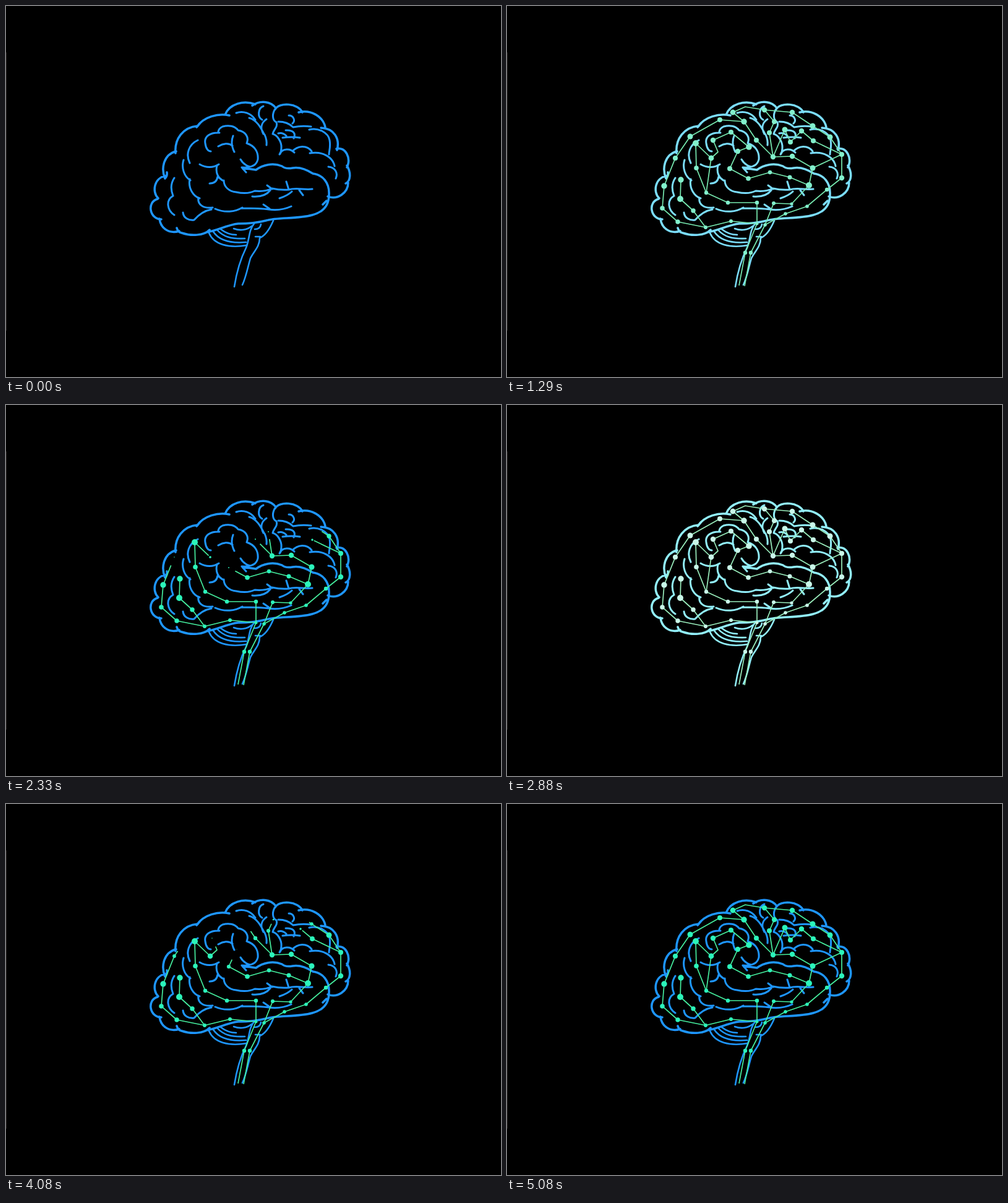
An HTML page for the animation above (5.12 s loop, 800 px wide and 600 px high).

```html
<!DOCTYPE html>
<html lang="en">
<head>
<meta charset="utf-8">
<title>Brain network</title>
<style>
  @property --t { syntax: "<number>"; inherits: true; initial-value: 0; }
  html, body { margin: 0; width: 100%; height: 100%; overflow: hidden; background: #000; }
  svg { display: block; width: 800px; height: 600px; animation: clock 1706.667ms linear infinite; }
  path { fill: none; }
  .brain { stroke: #1e96ff; stroke-linecap: round; stroke-linejoin: round;
    animation: glow 1706.667ms linear infinite; }
  .outer { stroke-width: 3.5; }
  .inner { stroke-width: 3; }
  .stem { stroke-width: 2.6; }
  .net path { stroke: #45ee9e; stroke-width: 1.7; stroke-linejoin: round;
    stroke-dasharray: calc(var(--len) * 1px) 2000px;
    stroke-dashoffset: calc((var(--len) - clamp(0, (var(--t) - var(--at)) * var(--v), var(--len))) * 1px);
    animation: glow-line 1706.667ms linear infinite; }
  .net circle { fill: #2bf5bb; transform-box: fill-box; transform-origin: center;
    scale: clamp(0, (var(--t) - var(--at)) / 80, 1);
    animation: glow-node 1706.667ms linear infinite; }
  @keyframes clock { from { --t: 0; } to { --t: 1706.667; } }
  @keyframes glow {
    0%, 61% { stroke: #1e96ff; }
    68.5%, 71.5% { stroke: #92effa; }
    92%, 100% { stroke: #1e96ff; }
  }
  @keyframes glow-line {
    0%, 61% { stroke: #45ee9e; }
    68% { stroke: #a0efc0; }
    71.5% { stroke: #84e9b4; }
    92%, 100% { stroke: #45ee9e; }
  }
  @keyframes glow-node {
    0%, 61% { fill: #2bf5bb; }
    68% { fill: #d8fbf0; }
    71.5% { fill: #98efd0; }
    92%, 100% { fill: #2bf5bb; }
  }
</style>
</head>
<body>
<svg viewBox="0 0 800 600">
  <rect y="75" width="1" height="450" fill="#2c2828"/>
  <g class="brain">
    <g class="outer">
      <!-- rim -->
      <path d="M251 345C232 345 227 317 245 312M246 311C235 300 240 277 258 275M260 269Q261 275 257 279C250 262 255 240 275 235
        M274 238C272 215 286 196 310 194M314 189L308 196C319 179 343 173 361 177M354 176C361 158 384 152 403 159
        M398 161C411 152 428 154 436 165M435 167C442 155 472 157 479 172M473 172C492 167 512 178 516 196
        M509 197C530 198 540 214 535 233M534 231C549 227 558 246 551 261M551 258C558 270 557 283 549 287
        M553 285C553 303 535 314 520 308"/>
      <path d="M248 344C250 360 264 369 280 364M276 359Q278 366 284 367C298 372 320 372 329 362
        M324 366C341 363 358 354 375 352C395 352 405 351 420 347C440 341 470 345 495 338C514 333 522 322 522 305
        C523 286 512 273 496 271C485 264 474 260 463 262Q452 264 446 259C431 253 415 257 404 265Q394 263 383 263
        M518 315L512 321"/>
    </g>
    <g class="inner">
      <!-- frontal folds -->
      <path d="M443 239C446 230 460 230 466 237M463 235C471 226 486 224 494 235M491 238C513 234 529 246 531 259
        M521 260C532 261 537 270 533 279M440 187C451 187 459 191 464 196Q478 193 493 195M457 177C465 177 468 186 463 190
        M490 200C505 196 521 205 523 217C525 228 522 234 522 240M447 213Q462 211 475 213M452 201C464 200 469 206 465 214
        M440 206Q447 204 453 210"/>
      <!-- central groove -->
      <path d="M416 162C407 165 406 180 414 184M421 183C412 189 411 198 416 207M434 168C429 178 432 186 437 188
        C440 196 432 200 431 207C438 208 446 220 445 230Q445 236 442 240M418 208Q422 217 421 225
        M372 173C383 169 396 173 403 184M393 181C405 184 412 197 417 207"/>
      <!-- parietal curl -->
      <path d="M345 205C330 204 320 211 322 222C323 231 327 235 331 235M343 203Q344 198 350 195C360 192 370 194 375 201
        C388 203 393 213 389 222C402 226 408 236 407 248C405 258 395 262 381 261M343 227C351 222 360 221 366 226
        M367 210C363 220 365 228 369 236M379 248Q384 257 394 260M381 261L388 269"/>
      <!-- temporal folds -->
      <path d="M313 256C323 262 335 262 344 256M341 258C338 270 343 279 352 283M329 287C337 287 341 283 342 276
        M352 282C352 293 361 300 372 301C386 304 396 302 402 299C412 300 422 299 430 295Q443 298 457 297
        M422 290L430 296M453 284L457 297C470 293 482 298 495 296M474 298L480 306M398 308C411 309 421 306 427 298
        M442 311C451 308 457 305 462 300"/>
      <path d="M310 217C295 224 290 240 297 254M287 249C283 262 288 276 298 282M297 280C294 295 303 308 313 311
        M311 310C309 321 319 328 334 326M338 328C354 335 370 333 382 326M380 327C396 327 411 327 425 329
        C440 331 452 328 461 324M416 321L426 328M272 278C266 287 266 297 270 307M270 307C258 314 260 330 272 338
        M286 334C287 343 295 347 304 346C311 338 320 331 332 329"/>
    </g>
    <g class="stem">
      <path d="M328 367C336 386 360 392 389 387M335 365C345 380 365 384 388 382M341 362C351 373 363 377 386 376
        M347 361C356 368 364 370 372 370M368 360C379 364 390 362 397 356"/>
      <path d="M401 352C392 363 394 376 388 391C378 411 372 435 369 454M432 347C426 361 418 372 410 375
        C410 390 400 397 395 408C390 425 388 438 382 451M412 353C411 360 406 361 402 361M411 373L403 373"/>
    </g>
  </g>
  <g class="net"></g>
</svg>
<script>
  const net = document.querySelector(".net");
  const speed = 0.56; // px per ms
  const reached = new Map();

  // Chains of "x,y,radius"; each begins at a point already reached.
  const chains = [
    "375,452,0 385,399,3.2 404,352,2.5 362,348,3 321,358,3 276,349,3.7 251,327,3.8 254,291,4.7 272,246,4 296,211,4.5 344,184,4 383,187,4.7 365,172,4.4",
    "404,352 404,318,3.2 357,318,3.2 322,302,3.2 306,262,3.8 305,222,5 330,246,4.4 341,236,0 333,217,4.2 362,204,4 391,228,4.8",
    "321,358 301,331,3.7 280,312,5 281,281,4.7",
    "384,453,0 394,399,3.2 417,354,2.8 431,319,3 460,320,2.6 488,290,5 494,262,4.5 461,243,4.2 430,244,4.2 424,205,4 432,187,4 416,168,4.2",
    "430,244 403,217,4 383,187",
    "488,290 457,277,3.5 425,269,3.2 390,279,3.8 360,263,4 373,235,4.2",
    "417,354 450,336,2.8 485,324,2.8 517,297,3.2 541,278,4.2 541,240,4 522,212,4.5 494,194,4.5 461,172,4.2",
    "541,240 495,218,4 476,202,4.2 458,220,4 449,200,4.5"
  ];
  // Closing links, drawn last.
  const links = [
    "365,172 385,163 416,168 461,172", "449,200 430,244", "391,228 373,235",
    "330,246 322,302", "494,262 541,240"
  ];

  function add(tag, attrs, vars) {
    const el = document.createElementNS("http://www.w3.org/2000/svg", tag);
    for (const k in attrs) el.setAttribute(k, attrs[k]);
    for (const k in vars) el.style.setProperty("--" + k, vars[k]);
    net.append(el);
  }

  const parse = s => s.split(" ").map(p => p.split(",").map(Number));
  const gap = (a, b) => Math.hypot(b[0] - a[0], b[1] - a[1]);
  const lengthOf = pts => pts.slice(1).reduce((sum, p, i) => sum + gap(pts[i], p), 0);

  function line(pts, at, v) {
    add("path", { d: "M" + pts.map(p => p[0] + " " + p[1]).join("L") }, { len: lengthOf(pts), at, v });
  }

  const nodes = [];
  for (const chain of chains) {
    const pts = parse(chain);
    const start = reached.get(pts[0].slice(0, 2).join()) ?? 20;
    line(pts, start, speed);
    pts.forEach((p, i) => {
      const key = p.slice(0, 2).join();
      if (reached.has(key)) return;
      const at = start + lengthOf(pts.slice(0, i + 1)) / speed;
      reached.set(key, at);
      if (p[2]) nodes.push([...p, at]);
    });
  }
  for (const link of links) {
    const pts = parse(link);
    line(pts, 965, lengthOf(pts) / 75);
  }
  for (const [cx, cy, r, at] of nodes) add("circle", { cx, cy, r }, { at: at - 40 });
</script>
</body>
</html>
```
